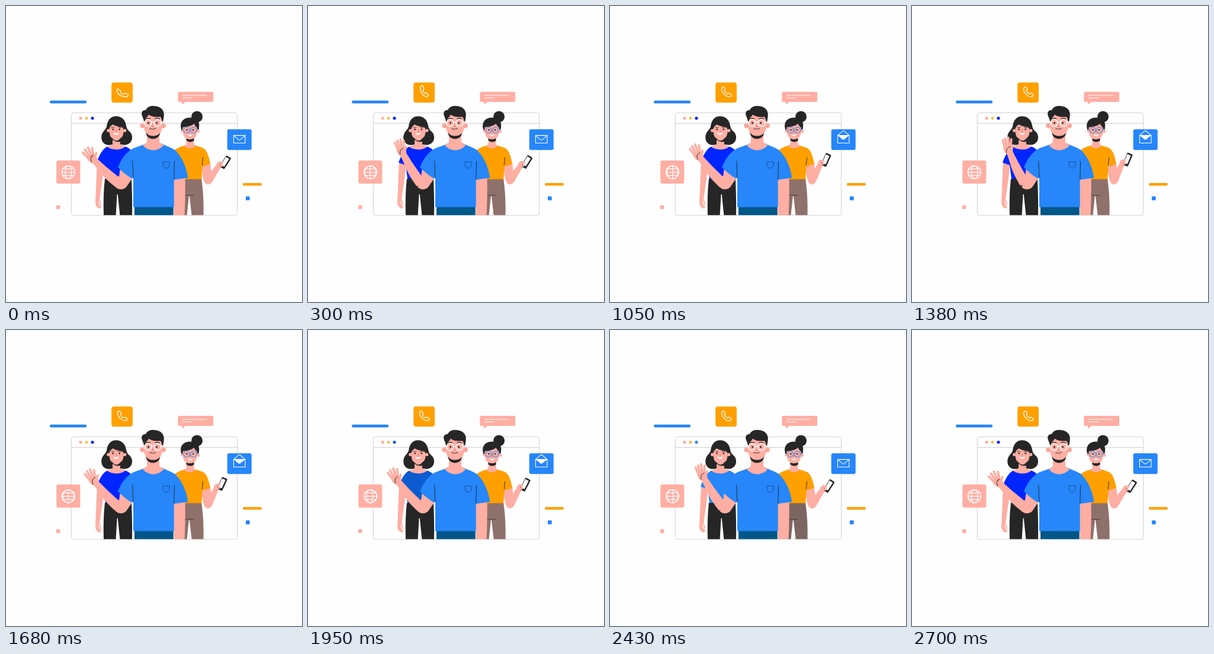
These frames come from a looping animation (500x500 px, 2730 ms). An HTML page:

```html
<!DOCTYPE html>
<html lang="en">
<head>
<meta charset="utf-8">
<title>Team</title>
<style>
  html, body { margin: 0; width: 100%; height: 100%; overflow: hidden; background: #fefefe; }
  svg { display: block; width: 100vw; height: 100vh; }
  .skin { fill: #ffaea3; }
  .finger { stroke: #ffaea3; stroke-width: 3.9; }
  .dark { fill: #262627; }
  .blue { fill: #2686fa; }
  .pink { fill: #ffaea3; }
  .orange { fill: #ffa000; }
  .line { fill: none; stroke: #262627; stroke-width: .9; }
  .pocket { fill: none; stroke: #1c4a86; stroke-width: .9; }
  .crease { fill: none; stroke: #e0705f; stroke-width: .8; }
  .white { fill: none; stroke: #fff; stroke-width: 1.1; }
  path, line { stroke-linecap: round; stroke-linejoin: round; }
</style>
</head>
<body>
<svg viewBox="0 0 500 500">
  <!-- window -->
  <g fill="none" stroke="#d6d4d6" stroke-width="1.1">
    <rect x="110.2" y="180.5" width="280.5" height="173.3" rx="4"/>
    <path d="M110.2 198.4H390.7"/>
  </g>
  <circle class="pink" cx="126" cy="189.5" r="2.6"/>
  <circle id="dot2" cx="136" cy="189.5" r="2.6"/>
  <circle id="dot3" cx="146" cy="189.5" r="2.6"/>

  <!-- floating pieces -->
  <rect class="blue" x="74" y="159.8" width="62" height="4.6" rx="2"/>
  <rect class="orange" x="400" y="299" width="32" height="4.4" rx="2"/>
  <rect class="pink" x="84.8" y="336.5" width="6.6" height="6.4" rx="1.5"/>
  <rect class="blue" x="405" y="321.6" width="6.8" height="6.6" rx="1.5"/>

  <rect class="orange" x="178.2" y="129.2" width="35.8" height="34" rx="4"/>
  <path id="handset" class="white" style="stroke-width:1.3" d="M-8-5.4C-7.6-7.4-6-8.6-4.8-8.2L-1.8-4.2C-1.6-3-3.2-2.4-3-1.2C-2 1 0 3 1.8 3.6C3 3.6 3.4 1.9 4.6 2.2L8.4 5.2C8.6 6.8 7 8.5 5.2 8.5C-1.4 8.5-8.5 1-8-5.4Z"/>

  <rect class="pink" x="290.4" y="145" width="59.8" height="17" rx="2"/>
  <path class="pink" d="M297 161V166.6L304.5 161Z"/>
  <path class="white" d="M298.5 151H338.8M298.5 155.2H314.2"/>

  <rect class="blue" x="373.8" y="208.2" width="41" height="35" rx="3"/>
  <path class="white" d="M384.5 218.6V231.5H404V218.6Z"/>
  <path id="inside" fill="#fff" d="M384.5 218.6H404L396.2 225Q394.2 226.6 392.2 225Z"/>
  <path id="flap" class="white"/>

  <rect class="pink" x="85.2" y="261" width="40.2" height="39" rx="3"/>
  <g class="white" transform="translate(105.4 280.8)" style="stroke-width:1.2">
    <circle r="11"/>
    <path d="M-11 0H11M-9.3-5.6H9.3M-9.3 5.6H9.3"/>
    <path id="meridians"/>
  </g>

  <!-- woman on the left -->
  <path class="skin" d="M154 262L165 266C165 284 161 304 159.5 317L158 327C161.5 331 161 337 160 342C154 342 150.5 337 151 330C152.3 308 152.6 286 154 262Z"/>
  <path d="M157 330C157.5 333 159 335 159 337" fill="none" stroke="#fefefe" stroke-width="1.4"/>
  <path class="dark" d="M167 292H212C213 316 213.4 336 213 353.2H192.4L188.8 318H187.6L185.6 353.2H165C164.5 332 164.6 312 167 292Z"/>
  <path id="shirt" d="M171 237.6C164 241 158 250 153 264.6L165 269L168 292H213V246C209 240 204 238 200 237Z"/>
  <path class="dark" d="M186 186.3C176 186.3 171 194 170 204C168 210 161.4 212 161.2 222C161.2 232 170 237 179 234H195C206 237 214 230 213 220.5C212 211 205 212 203.4 204C202 193 196 186.3 186 186.3Z"/>
  <path class="skin" d="M180 220H193V234C197 235.5 199.5 236 201.5 237.4C194 244.2 179 244.2 170.6 237.6C174 236 178 235.5 180 234Z"/>
  <path class="dark" d="M180 224Q186.5 231 193 224L193 229Q187 231 180 226Z"/>
  <circle class="skin" cx="173" cy="210.5" r="2.8"/>
  <circle class="skin" cx="200.6" cy="210.5" r="2.8"/>
  <path class="skin" d="M174.6 208C175 204 178 202 180.5 200C186 204 193 203.5 197 205.5C199.4 208 199 215 197 219.5C194 226.5 179 226.5 176 219.5C174.8 216 174.5 212 174.6 208Z"/>
  <g class="dark"><circle cx="180.7" cy="208.4" r="1.3"/><circle cx="191.8" cy="208.4" r="1.3"/></g>
  <path class="line" d="M178 205.6Q180.6 204 183 205.3M189.4 205.3Q192 204 194.6 205.8"/>
  <path class="crease" d="M186.5 209L185.6 212.3H187"/>
  <path fill="#fff" d="M181.3 214.2Q186 215.6 190.8 214.2C190 218.6 182.4 218.8 181.3 214.2Z"/>

  <!-- woman on the right -->
  <path id="trousers" d="M300 291H330C333 310 334.2 332 333.6 353.2H313.6L310 321H309L305.6 353.2H300Z"/>
  <path class="line" style="stroke-width:.7" d="M302 319.8H317"/>
  <g id="phoneArm">
    <path class="skin" d="M337.5 290L355 269C356 265 359 263 361.5 262L368.6 266C368 271 363 273.4 361.4 275L348.4 297C344 303.5 336 302 335.5 296Z"/>
    <g transform="translate(370.4 264) rotate(33)">
      <rect class="dark" x="-4.9" y="-11" width="9.8" height="22" rx="1.6"/>
      <rect x="-4.1" y="-8.4" width="6.6" height="15.6" fill="#fafafa"/>
    </g>
    <path class="finger" style="stroke-width:3.2" fill="none" d="M360 266.4L365.6 265M361 270L364.8 269.8"/>
  </g>
  <path class="skin" d="M330 266L345 264L347 282C348 292 347 300 341 301.5C334 301 333 290 331 280Z"/>
  <path class="orange" d="M302 235.5C294 238 288 240 282 246V292.4H330.4L331.6 271.5L345.2 266.8C342.6 254 339.6 244.4 334 240.6C330 238 324 237 319.4 235.4Z"/>
  <path class="line" d="M332.7 256L331.3 268.6"/>
  <path class="skin" d="M304.5 220H317.5V233.5L321 236C315 241.6 306 241.6 300.6 236L304.5 233.5Z"/>
  <path class="dark" d="M304.5 221H317.5V227.6Q311 232 304.5 227Z"/>
  <circle class="dark" cx="322.6" cy="187" r="9.5"/>
  <path class="dark" d="M296 208C293 197 299 189 310 188.6C322 188.4 328 196 326 205C326 208 325 210 323 211H297Z"/>
  <circle class="skin" cx="324.6" cy="211.4" r="2.7"/>
  <circle class="skin" cx="297.6" cy="211.4" r="2.1"/>
  <path class="skin" d="M298.5 205C304 203.8 313 203.4 317.6 198.8C319 202 321 204 323 206C323.4 213 322.4 218 320 221.5C316 226.4 305 226.4 301.6 221.5C299 218 298 211 298.5 205Z"/>
  <g class="dark"><circle cx="305.6" cy="209.3" r="1.2"/><circle cx="316" cy="209.3" r="1.2"/></g>
  <g fill="none" stroke="#4a8ee8" stroke-width="1.2">
    <circle cx="305" cy="209.6" r="4.9"/><circle cx="316.7" cy="209.6" r="4.9"/><path d="M309.9 209H311.8M321.6 209L324 208.6"/>
  </g>
  <path class="crease" d="M311 211L310.2 214H311.6"/>
  <path fill="#fff" d="M306.6 217.2Q311 218.4 315.4 217.2C314 220.6 308 220.6 306.6 217.2Z"/>

  <!-- man -->
  <g id="waveArm">
    <path class="skin" d="M154.6 240C154.4 235.6 160 234 164.4 234.4C168 234.6 170.6 238 170.6 241.6C170.4 243.6 170.4 245.4 171 247L179.6 264L192 286L206 292L183 303.6C176.6 293 170.4 281 167 270C165 262 162.8 256 160.6 250C157 247.6 154.8 244 154.6 240Z"/>
    <g id="fingers"></g>
    <path class="line" d="M166.4 237.6C161.6 238.2 159.2 241.6 159.8 247.4"/>
  </g>
  <path class="skin" d="M192.6 276L214 290L203 306C198 311.5 189 310.5 185.5 306L191 288Z"/>
  <path class="skin" d="M283.6 290H302.6C303 311 302.6 332 301.6 353.2H283.6Z"/>
  <path fill="#005788" d="M217 338H282.8V353.2H217Z"/>
  <path class="blue" d="M235 232.6C228 236.6 219 238 213 241.6C202 248 194.6 259 189.2 272.4C196 279.6 204 286.4 213 291.4L215 290V339.8H283.8V293.4L307.4 290.2C305 273 298 256 286 244C279 238.4 270 237 263 232.6Z"/>
  <path class="line" d="M213.7 262L215 290M284.6 262.4L283.8 293"/>
  <path class="pocket" d="M265.4 263.4H276.2V269C276.2 272 273 274 270.8 274C268.4 274 265.4 272 265.4 269Z"/>
  <path class="skin" d="M238 212H259V229.5C261 232.5 264 233.4 266.6 235C257 246.4 240 246.4 231 235C234 233.4 237 232 238 229.5Z"/>
  <path class="dark" d="M236 211H260.6C260.4 220 255.4 224.4 248.2 224.4C241 224.4 236.4 220 236 211Z"/>
  <circle class="skin" cx="230.4" cy="202.2" r="4.2"/>
  <circle class="skin" cx="266" cy="202.2" r="4.2"/>
  <path class="crease" d="M229 201.5Q231 201.5 231.4 204M267.6 201.5Q265.6 201.5 265.2 204"/>
  <path class="skin" d="M233 184H264V204C263.4 214.6 256 219.6 248.4 219.6C240.6 219.6 233.8 214.6 233 204Z"/>
  <path class="dark" d="M233 195C232.4 190 230 187 229.2 183C228.8 178.6 231.8 175.4 236.2 175.8C237.6 171.6 242.6 169 247.4 168.8C257 168.6 266 172.4 266.8 182C267 188 265.6 192.6 265 197C263.2 195 263.4 190 261 187.2C253 188 246 187.4 241 183.6C239.6 187.4 235.6 188.6 234.8 194Z"/>
  <g fill="none" stroke="#fff" stroke-width="1.5">
    <circle cx="240.2" cy="197.6" r="5.8"/><circle cx="255.8" cy="197.6" r="5.8"/>
    <path d="M246 196.6Q248 195.6 250 196.6M234.2 196.6L232 195.8M261.8 196.6L264.6 195.8"/>
  </g>
  <g class="dark"><circle cx="240.6" cy="197.4" r="1.5"/><circle cx="254.6" cy="197.4" r="1.5"/></g>
  <path class="line" style="stroke-width:1.3" d="M236.4 190.8Q240 188.8 243.6 190.4M252 190.4Q256 188.8 259.6 190.8"/>
  <path class="crease" d="M248 198L246.4 203.4H249.2"/>
  <path class="line" d="M242.6 207.2Q247.6 209.4 252.8 207"/>
</svg>
<script>
const $ = id => document.getElementById(id);
const set = (id, name, value) => $(id).setAttribute(name, value);
const STEP = 30, FRAMES = 91;

// base x, base y, tip x, tip y, extra spread in degrees
const fingers = [
  [157, 240, 153.8, 226.4, -9],
  [160, 238, 158, 223.6, -5],
  [163.5, 237, 163, 222.2, -1],
  [166.6, 238, 168, 225.2, 4],
  [167.4, 243, 171, 235.4, 10]
];
const parts = fingers.map(([x, y, tx, ty]) => {
  const p = document.createElementNS("http://www.w3.org/2000/svg", "path");
  p.setAttribute("class", "finger");
  p.setAttribute("d", `M${x} ${y}L${tx} ${ty}`);
  return $("fingers").appendChild(p);
});

const swing = (t, period) => (1 - Math.cos(2 * Math.PI * t / period)) / 2;
const ease = (t, from, to) => {
  const u = Math.min(1, Math.max(0, (t - from) / (to - from)));
  return u * u * (3 - 2 * u);
};

function wave(t) {
  const back = 1 - swing(t, 900);
  set("waveArm", "transform", `rotate(${-21.4 * back} 195 295)`);
  parts.forEach((p, i) => {
    const [x, y, , , spread] = fingers[i];
    p.setAttribute("transform", `rotate(${spread * back} ${x} ${y})`);
  });
}

function envelope(t) {
  const open = ease(t, 540, 1080) - ease(t, 1980, 2400);
  const tip = 227.2 - 17 * open;
  const shoulder = tip + (218.6 - tip) * .15;
  set("flap", "d", `M384.5 218.6L392.7 ${shoulder}Q394.2 ${tip} 395.7 ${shoulder}L404 218.6`);
  set("inside", "opacity", tip < 218.6 ? 1 : 0);
}

function globe(t) {
  const turn = t / 675 % 1 * 60;
  let d = "";
  for (let lon = -90; lon < 90; lon += 60) {
    const s = 11 * Math.sin((lon + turn) * Math.PI / 180);
    d += `M0-11A${Math.abs(s)} 11 0 0 ${s > 0 ? 1 : 0} 0 11`;
  }
  set("meridians", "d", d);
}

function ring(t) {
  const angle = t < 300 ? -18 + 32 * ease(t, 0, 300) : 14 * (1 - ease(t, 300, 600));
  set("handset", "transform", `translate(196.6 ${144.9 - angle / 12}) rotate(${angle})`);
}

function tint(t) {
  const late = t >= 2160 && t < 2610;
  const shirt = late ? "#2686fa" : t >= 1800 && t < 2160 ? "#0d5bd0" : "#0026ff";
  set("shirt", "fill", shirt);
  set("dot3", "fill", shirt);
  set("dot2", "fill", late ? "#f8b84c" : "#eec75c");
  set("trousers", "fill", late ? "#7b6662" : "#8f716b");
}

function render(t) {
  wave(t);
  set("phoneArm", "transform", `rotate(${-10 * swing(t, 2700)} 341 297)`);
  envelope(t);
  globe(t);
  ring(t);
  tint(t);
}

function tick(now) {
  render(Math.floor(now / STEP) % FRAMES * STEP);
  requestAnimationFrame(tick);
}
render(0);
requestAnimationFrame(tick);
</script>
</body>
</html>
```
